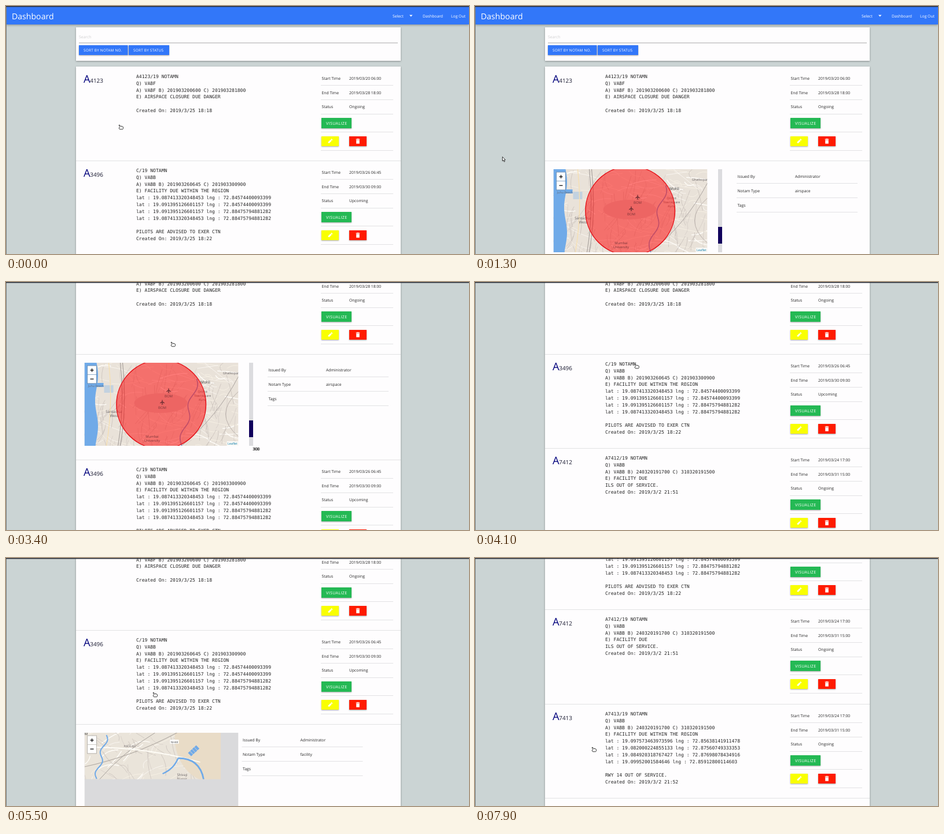
These frames come from a looping animation (800 px wide and 430 px high, 8000 ms). An HTML page with a canvas:

```html
<!DOCTYPE html>
<html lang="en">
<head>
<meta charset="utf-8">
<title>Dashboard</title>
<style>
html, body { margin: 0; width: 800px; height: 430px; overflow: hidden; background: #cbd4d4; }
canvas { display: block; }
</style>
</head>
<body>
<canvas id="stage" width="800" height="430"></canvas>
<script>
const ctx = document.getElementById('stage').getContext('2d');
const SANS = '"Open Sans", "Noto Sans", sans-serif';
const MONO = '"DejaVu Sans Mono", monospace';
const LOOP = 8000, PITCH = 163.2, PANEL = 183, LIST_TOP = 105;
const BLUE = '#3277f9', PAPER = '#fefdfe', INK = '#252525', RULE = '#e2e2e4';
const MAP_W = 266, MAP_H = 144, MAROON = '#7b3438', WATER = '#70aae8';

const items = [
  { no: '4123', start: '2019/03/20 06:00', end: '2019/03/28 18:00', status: 'Ongoing', text:
`A4123/19 NOTAMN
Q) VABF
A) VABF B) 201903200600 C) 201903281800
E) AIRSPACE CLOSURE DUE DANGER

Created On: 2019/3/25 18:18` },
  { no: '3496', start: '2019/03/26 06:45', end: '2019/03/30 09:00', status: 'Upcoming', text:
`C/19 NOTAMN
Q) VABB
A) VABB B) 201903260645 C) 201903300900
E) FACILITY DUE WITHIN THE REGION
lat : 19.087413320348453 lng : 72.84574400093399
lat : 19.091395126601157 lng : 72.84574400093399
lat : 19.091395126601157 lng : 72.88475794881282
lat : 19.087413320348453 lng : 72.88475794881282

PILOTS ARE ADVISED TO EXER CTN
Created On: 2019/3/25 18:22` },
  { no: '7412', start: '2019/03/24 17:00', end: '2019/03/31 15:00', status: 'Ongoing', text:
`A7412/19 NOTAMN
Q) VABB
A) VABB B) 240320191700 C) 310320191500
E) FACILITY DUE
ILS OUT OF SERVICE.
Created On: 2019/3/2 21:51` },
  { no: '7413', start: '2019/03/24 17:00', end: '2019/03/31 15:00', status: 'Ongoing', text:
`A7413/19 NOTAMN
Q) VABB
A) VABB B) 240320191700 C) 310320191500
E) FACILITY DUE WITHIN THE REGION
lat : 19.097573463973596 lng : 72.85638141911478
lat : 19.082000224855133 lng : 72.87560749333353
lat : 19.084920318767427 lng : 72.87698078434916
lat : 19.09952001584646 lng : 72.85912800114603

RWY 14 OUT OF SERVICE.
Created On: 2019/3/2 21:52` },
  { no: '7414', start: '2019/03/24 17:00', end: '2019/03/31 15:00', status: 'Ongoing', text: 'A7414/19 NOTAMN' }
];

// Pointer moves: from time, to time, target x, target y
const moves = [
  [500, 1150, 49, 266], [1400, 2600, 288, 108], [3900, 4450, 257, 237],
  [6500, 6950, 122, 321], [7250, 7550, 205, 332]
];

const clamp = v => Math.max(0, Math.min(1, v));
const ease = (t, a, b) => 0.5 - Math.cos(Math.PI * clamp((t - a) / (b - a))) / 2;

function random(seed) {
  return () => (seed = (seed * 16807) % 2147483647) / 2147483647;
}

function rect(x, y, w, h, color) {
  ctx.fillStyle = color;
  ctx.fillRect(x, y, w, h);
}

function text(str, x, y, size = 6.8, color = INK, opt = {}) {
  ctx.font = `${size}px ${opt.font || SANS}`;
  ctx.textRendering = 'geometricPrecision';
  ctx.letterSpacing = (opt.gap || 0) + 'px';
  ctx.textAlign = opt.align || 'left';
  ctx.fillStyle = color;
  ctx.fillText(str, x, y);
}

function raised(x, y, w, h, color, blur = 2) {
  ctx.save();
  ctx.shadowColor = 'rgba(0,0,0,.35)';
  ctx.shadowBlur = blur;
  ctx.shadowOffsetY = 1;
  rect(x, y, w, h, color);
  ctx.restore();
}

function button(str, x, y, w, h, color, size, gap) {
  raised(x, y, w, h, color);
  text(str, x + 8, y + h / 2 + size * 0.37, size, '#fff', { gap });
}

// One bent stroke; bend is the sideways bulge of its middle
function arc(x0, y0, x1, y1, bend, color, width) {
  const len = Math.hypot(x1 - x0, y1 - y0) || 1;
  const cx = (x0 + x1) / 2 + (y1 - y0) / len * bend * 2;
  const cy = (y0 + y1) / 2 - (x1 - x0) / len * bend * 2;
  ctx.beginPath();
  ctx.moveTo(x0, y0);
  ctx.quadraticCurveTo(cx, cy, x1, y1);
  ctx.strokeStyle = color;
  ctx.lineWidth = width;
  ctx.stroke();
}

// A stream running down from (x, y0) to y1, leaning and winding
function stream(x, y0, y1, lean, sway, width, color) {
  ctx.beginPath();
  for (let y = y0; y <= y1; y += 2) {
    const k = (y - y0) / (y1 - y0);
    ctx.lineTo(x + lean * k + sway * Math.sin(k * 13), y);
  }
  ctx.strokeStyle = color;
  ctx.lineWidth = width;
  ctx.stroke();
}

function header() {
  raised(0, 0, 800, 32, BLUE, 4);
  text('Dashboard', 10, 23, 14.1, '#fff');
  text('Select', 668, 20.2, 6.8, '#fff');
  ctx.fill(new Path2D('M697 15.5h5.5l-2.75 3z'));
  text('Dashboard', 720, 20.2, 6.8, '#fff');
  text('Log Out', 769, 20.2, 6.8, '#fff');
  raised(121, 37, 561, 58, PAPER, 3);
  text('Search', 126, 56.4, 6.8, '#d0d0d2');
  rect(126, 63.5, 551, 1, '#a8a8a8');
  button('SORT BY NOTAM NO.', 126, 68, 84.5, 17, BLUE, 6.4, 0.24);
  button('SORT BY STATUS', 212, 68, 70, 17, BLUE, 6.4, 0.24);
}

function pencil(x, y) {
  ctx.save();
  ctx.translate(x, y);
  ctx.rotate(-Math.PI / 4);
  rect(-4, -1.4, 6.4, 2.8, '#fff');
  rect(3.1, -1.4, 1.8, 2.8, '#fff');
  ctx.restore();
}

function bin(x, y) {
  rect(x - 3.3, y - 4, 6.6, 1.2, '#fff');
  rect(x - 1.3, y - 4.6, 2.6, 1, '#fff');
  rect(x - 2.8, y - 2.2, 5.6, 6.4, '#fff');
}

function rows(pairs, x, x2, y, first, right) {
  pairs.forEach(([key, value], i) => {
    const base = y + first + i * 24.9;
    text(key, x, base);
    text(value, x2, base);
    rect(x - 1.5, Math.round(base + 9.4), right - x + 1.5, 1, RULE);
  });
}

function drawItem(item, y) {
  text('A', 134, y + 28, 18.3, '#00007c');
  text(item.no, 145.3, y + 28, 9.9, '#191930');
  item.text.split('\n').forEach((s, i) => text(s, 225, y + 19.8 + i * 11.85, 8.07, INK, { font: MONO }));
  rows([['Start Time', item.start], ['End Time', item.end], ['Status', item.status]], 545.5, 593, y, 22.6, 669);
  button('VISUALIZE', 545, y + 89, 52, 18, '#24b954', 7, 0.4);
  rect(544, y + 113, 125, 1, RULE);
  raised(545, y + 121, 30, 17, '#f9ff00');
  raised(593, y + 121, 30, 17, '#ff1b00');
  pencil(560, y + 129.5);
  bin(608, y + 129.5);
  rect(544, y + 145, 125, 1, RULE);
}

// Short streets in two crossing directions
function streets(seed, tilt, count) {
  const rnd = random(seed);
  const tones = ['#fffdf9', '#d3cbc4', '#fbf5e8', '#c6beb8'];
  for (let i = 0; i < count; i++) {
    const x = rnd() * MAP_W, y = rnd() * MAP_H, len = 12 + rnd() * 45;
    const a = tilt + (i % 2) * Math.PI / 2 + (rnd() - 0.5);
    arc(x, y, x + Math.cos(a) * len, y + Math.sin(a) * len, (rnd() - 0.5) * 9, tones[i % 4], i % 12 ? 0.7 : 1.4);
  }
}

function zoom() {
  rect(4.5, 4.5, 17, 32, 'rgba(90,90,90,.35)');
  for (const y of [5.5, 20.8]) {
    rect(5.5, y, 15, 14.6, '#fff');
    rect(10, y + 6.8, 6, 1.3, '#111');
  }
  rect(12.4, 9.9, 1.3, 6, '#111');
}

function label(str, x, y, size = 5.6, color = '#666164') {
  str.split('\n').forEach((s, i) => text(s, x, y + i * 7, size, color, { align: 'center' }));
}

function airport(x, y) {
  ctx.save();
  ctx.translate(x, y);
  ctx.fillStyle = MAROON;
  ctx.fill(new Path2D('M-.7-4H.7V-1.5L4 1V2L.7 1V3L2 4H-2L-.7 3V1L-4 2V1L-.7-1.5z'));
  ctx.restore();
  label('BOM', x, y + 11, 6, MAROON);
}

// Both maps use their own top left corner as zero
function coastMap() {
  rect(0, 0, MAP_W, MAP_H, '#e9e2d9');
  streets(77, 0.25, 240);
  ctx.beginPath();
  ctx.moveTo(0, 0);
  for (let y = 0; y <= MAP_H; y += 4) ctx.lineTo(21 + 2.5 * Math.sin(y / 14), y);
  ctx.lineTo(0, MAP_H);
  ctx.fillStyle = WATER;
  ctx.fill();
  rect(18, 35, 15, 7, WATER);
  rect(34, 39, 16, 13, '#c3d2e0');
  for (const x of [42, 62, 66]) arc(x, 0, x - 4, MAP_H, 5, x < 50 ? '#f8dfab' : '#a9a29e', 1.2);
  arc(266, 24, 168, 144, 8, '#aaa3a0', 1);
  arc(266, 50, 266, 128, -22, '#b9b0aa', 1);
  stream(194, 28, 144, -28, 4.5, 1.7, '#7895cf');
  ctx.beginPath();
  ctx.ellipse(132, 70, 46, 17, 0, 0, 7);
  ctx.fillStyle = '#d8cac6';
  ctx.fill();
  label('Ghatkopar', 253, 20);
  label('Mohli', 209, 36, 6.4, '#333');
  label('Orchid\nTownsquare\nKurla', 204, 52, 5.2);
  label('Juhu Beach', 20, 42, 5.2, '#626c79');
  label('Santacruz\nWest', 51, 87, 6.2);
  ctx.beginPath();
  ctx.arc(132.7, 72.2, 77.3, 0, 7);
  ctx.fillStyle = 'rgba(255,18,18,.54)';
  ctx.fill();
  ctx.strokeStyle = '#e51219';
  ctx.lineWidth = 1.5;
  ctx.stroke();
  airport(145.5, 48.5);
  airport(134.5, 68.5);
  label('Mumbai\nUniversity', 117, 130, 5.8, MAROON);
  rect(246, 136, 20, 8, 'rgba(255,255,255,.75)');
  text('Leaflet', 247.5, 142, 5.3, '#0078a8');
  zoom();
}

function riverMap() {
  rect(0, 0, MAP_W, MAP_H, '#dadadc');
  clipBox(0, 0, 235.5, 80.5, () => {
    rect(0, 0, 236, 81, '#eae4da');
    streets(421, -0.6, 170);
    ctx.beginPath();
    ctx.ellipse(222, 8, 66, 78, 0, 0, 7);
    ctx.fillStyle = '#e9dcc7';
    ctx.fill();
    arc(0, 59, 160, 0, -6, '#b3aca5', 1.2);
    arc(26, 81, 122, 0, 5, '#a7a19c', 1);
    arc(18, 25, 200, 51, 6, '#fffdf7', 1.8);
    stream(38, 4, 81, -18, 4, 2, WATER);
    arc(135, 71, 162, 44, -4, WATER, 2.4);
    arc(162, 44, 206, 81, 12, WATER, 2.8);
    ctx.save();
    ctx.translate(189, 31);
    ctx.rotate(-0.75);
    for (let i = 0; i < 4; i++) rect(-10 + i * 5, -4, 4.4, 8, WATER);
    ctx.restore();
    rect(148, 12, 15, 7, '#fff');
    label('NH48', 155.5, 17.5, 4.8, '#444');
    label('PIROL RD', 78, 25, 4.5);
    label('Shivaji\nNagar', 169, 75, 6);
    label('M', 3, 4, 6, '#333');
  });
  zoom();
}

function clipBox(x, y, w, h, draw) {
  ctx.save();
  ctx.beginPath();
  ctx.rect(x, y, w, h);
  ctx.clip();
  draw();
  ctx.restore();
}

function drawPanel(index, y) {
  ctx.save();
  ctx.translate(135.5, y + 15);
  clipBox(0, 0, MAP_W, MAP_H, index ? riverMap : coastMap);
  ctx.restore();
  if (!index) {
    rect(420, y + 15, 7, MAP_H, '#dcdcdf');
    rect(420, y + 115, 7, 29, '#10005c');
    for (const x of [426, 427]) text('300', x, y + 167, 6.8, '#111');
  }
  const x = index ? 409 : 453.5;
  rows([['Issued By', 'Administrator'], ['Notam Type', index ? 'facility' : 'airspace'], ['Tags', '']],
    x, x + 99.5, y, 29.8, x + 207.5);
}

const HAND = new Path2D('M-3.4-3.2L-2.4-4L-.6-1.7L3-1.2L4 0V2.6L3.2 3.8H-2L-3.4 1.4L-2 .6L-1.6-.4z');
const ARROW = new Path2D('M-2-4.5V2.8L-.3 1.3L1 4.2L2.2 3.6L1 .9L3.2 .7z');

function pointer(t) {
  let x = 198, y = 210;
  for (const [from, to, tx, ty] of moves) {
    const k = ease(t, from, to);
    x += (tx - x) * k;
    y += (ty - y) * k;
  }
  const icon = x > 123 ? HAND : ARROW;
  ctx.save();
  ctx.translate(x + 0.4, y);
  ctx.fillStyle = '#fff';
  ctx.fill(icon);
  ctx.strokeStyle = '#222';
  ctx.lineWidth = 0.9;
  ctx.stroke(icon);
  ctx.restore();
}

function draw(t) {
  const scroll = Math.round(143 * ease(t, 1850, 2650) + 199 * ease(t, 7280, 7780));
  const open = [
    ease(t, 150, 550) - ease(t, 3600, 4000),
    ease(t, 4700, 5100) - ease(t, 6400, 6800)
  ];
  rect(0, 0, 800, 430, '#cbd4d4');
  ctx.save();
  ctx.translate(0, -scroll);
  header();
  raised(121, LIST_TOP, 561, 1400, PAPER, 3);
  let shift = 0;
  items.forEach((item, i) => {
    const y = Math.round(LIST_TOP + i * PITCH + shift);
    const bottom = Math.round(LIST_TOP + (i + 1) * PITCH + shift);
    drawItem(item, y);
    const h = PANEL * (open[i] || 0);
    if (h > 0.5) {
      clipBox(121, bottom, 561, h, () => drawPanel(i, bottom));
      rect(121, Math.round(bottom + h), 561, 1, RULE);
    }
    rect(121, bottom, 561, 1, RULE);
    shift += h;
  });
  ctx.restore();
  rect(0, 0, 1, 430, '#737b7d');
  rect(0, 0, 800, 1.6, '#2f333c');
  pointer(t);
}

function tick(now) {
  draw(now % LOOP);
  requestAnimationFrame(tick);
}
draw(0);
requestAnimationFrame(tick);
</script>
</body>
</html>
```
